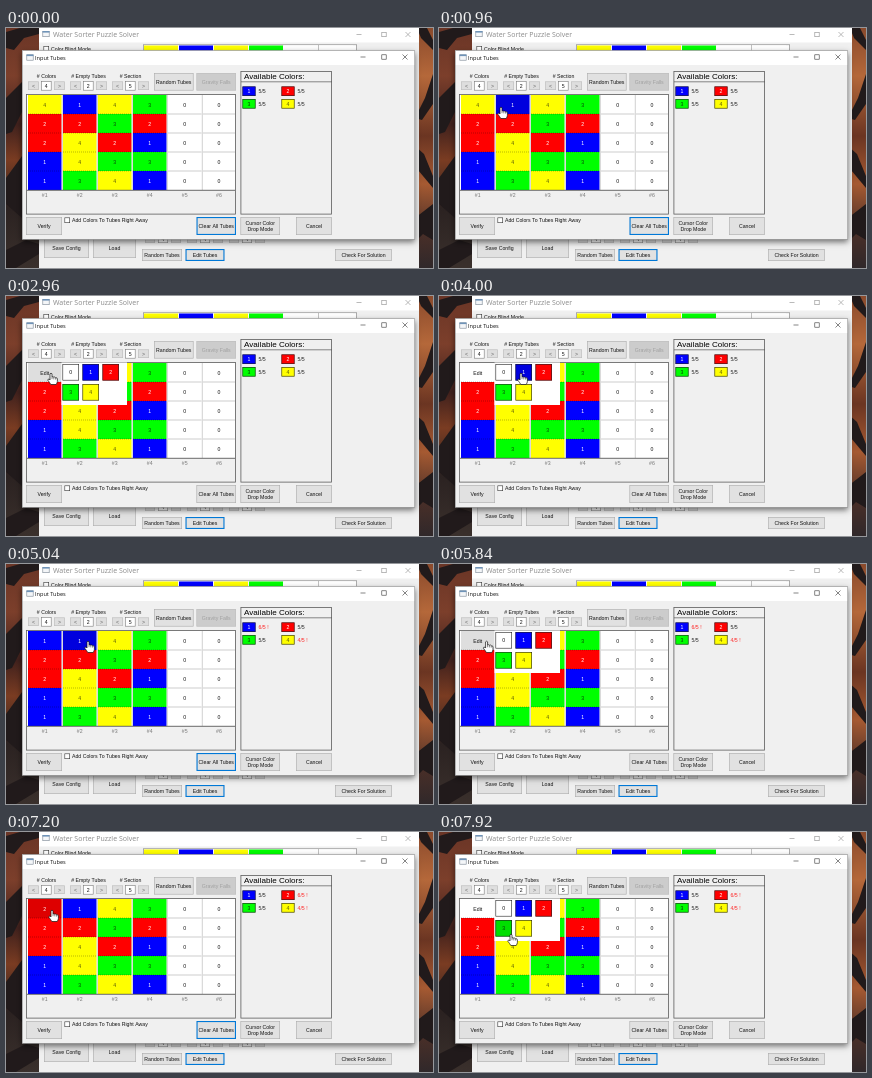
These frames come from a looping animation (427 px wide and 240 px high, 8 s). An HTML page with a canvas:

```html
<!DOCTYPE html>
<html lang="en">
<head>
<meta charset="utf-8">
<title>Input Tubes</title>
<style>
  html, body { margin: 0; width: 100%; height: 100%; overflow: hidden; background: #2a2020; }
  canvas { display: block; width: 427px; height: 240px; }
</style>
</head>
<body>
<canvas id="stage"></canvas>
<script>
const W = 427, H = 240, LOOP = 8000;
const canvas = document.getElementById('stage');
const ratio = window.devicePixelRatio || 1;
canvas.width = W * ratio;
canvas.height = H * ratio;
const ctx = canvas.getContext('2d');
ctx.scale(ratio, ratio);

const SANS = '"Liberation Sans", Arial, sans-serif';
const TITLE = '"Open Sans", sans-serif';
const FACE = '#f0f0f0', BLUE = '#0078d7';
const FILL = ['#ffffff', '#0000ff', '#ff0000', '#00ff00', '#ffff00'];
const INK = ['#111111', '#ffffff', '#ffffff', '#084008', '#55550a'];
const TUBES = [
  [4, 2, 2, 1, 1], [1, 2, 4, 4, 3], [4, 3, 2, 3, 4],
  [3, 2, 1, 3, 1], [0, 0, 0, 0, 0], [0, 0, 0, 0, 0]
];

// Intervals in which the colour popup is open
const POPUPS = [[2720, 4240], [5600, 6720], [7280, LOOP]];

// Cursor hot spot: time, x, y
const PATH = [
  [0, 112, 250], [80, 112, 246], [640, 66, 98], [960, 62, 79], [1360, 118, 86],
  [1760, 168, 114], [1920, 168, 115], [2560, 45, 77], [3040, 45, 77],
  [3900, 82, 77], [5080, 82, 77], [5520, 45, 77], [5760, 45, 77],
  [6400, 104, 78], [6760, 104, 78], [7180, 46, 78], [7360, 46, 78], [7840, 72, 102], [8000, 72, 102]
];

function rect(x, y, w, h, fill, edge, line = 0.6) {
  if (fill) {
    ctx.fillStyle = fill;
    ctx.fillRect(x, y, w, h);
  }
  if (edge) {
    ctx.strokeStyle = edge;
    ctx.lineWidth = line;
    ctx.strokeRect(x + line / 2, y + line / 2, w - line, h - line);
  }
}

function text(s, x, y, { size = 5.2, color = '#111', align = 'left', font = SANS } = {}) {
  ctx.font = `${size}px ${font}`;
  ctx.fillStyle = color;
  ctx.textAlign = align;
  ctx.fillText(s, x, y);
}

function line(points, color, width = 0.6, dash = []) {
  ctx.beginPath();
  points.forEach(([x, y]) => ctx.lineTo(x, y));
  ctx.setLineDash(dash);
  ctx.strokeStyle = color;
  ctx.lineWidth = width;
  ctx.stroke();
  ctx.setLineDash([]);
}

function polygon(points, fill) {
  ctx.beginPath();
  points.forEach(([x, y]) => ctx.lineTo(x, y));
  ctx.closePath();
  ctx.fillStyle = fill;
  ctx.fill();
}

function button(label, x, y, w, h, { focus = false, disabled = false } = {}) {
  rect(x, y, w, h, disabled ? '#cccccc' : '#e1e1e1',
    focus ? BLUE : disabled ? '#bfbfbf' : '#adadad', focus ? 1.1 : 0.6);
  const rows = label.split('\n');
  rows.forEach((row, i) => text(row, x + w / 2, y + h / 2 + 2 + (i - (rows.length - 1) / 2) * 6.2,
    { align: 'center', color: disabled ? '#a0a0a0' : '#111' }));
}

function checkbox(label, x, y) {
  rect(x, y, 5.5, 5.5, '#fff', '#333');
  text(label, x + 7.5, y + 4.6);
}

function windowButtons(xs, y, color) {
  const [min, max, close] = xs;
  line([[min - 2.5, y], [min + 2.5, y]], color);
  rect(max - 2.5, y - 2.5, 5, 5, null, color);
  line([[close - 2.5, y - 2.5], [close + 2.5, y + 2.5]], color);
  line([[close + 2.5, y - 2.5], [close - 2.5, y + 2.5]], color);
}

function icon(x, y) {
  rect(x, y, 7, 6, '#f4f6f8', '#7d8894');
  rect(x, y, 7, 1.6, '#6f93b8');
}

function wallpaper() {
  const left = ctx.createLinearGradient(0, 0, 0, H);
  [[0, '#6a3526'], [0.2, '#7c3f2b'], [0.4, '#40211d'], [0.55, '#7a3c22'], [0.75, '#2b2221'], [1, '#3a302c']]
    .forEach(stop => left.addColorStop(...stop));
  rect(0, 0, 40, H, left);
  const right = ctx.createLinearGradient(0, 0, 0, H);
  [[0, '#8a4a2c'], [0.2, '#b5683a'], [0.45, '#6b3522'], [0.65, '#a65a32'], [0.85, '#4a2f28'], [1, '#30282a']]
    .forEach(stop => right.addColorStop(...stop));
  rect(400, 0, 27, H, right);
  const dark = '#211a1b';
  polygon([[0, 4], [14, 0], [33, 0], [33, 6], [18, 10], [8, 22], [0, 20]], dark);
  polygon([[0, 70], [16, 54], [16, 84], [6, 104], [0, 106]], dark);
  polygon([[0, 150], [16, 128], [16, 190], [0, 176]], dark);
  polygon([[0, 222], [20, 212], [33, 216], [33, 226], [10, 240], [0, 240]], dark);
  polygon([[411, 0], [421, 0], [427, 12], [427, 22], [415, 10]], dark);
  polygon([[427, 46], [427, 76], [416, 92], [409, 90], [419, 70]], dark);
  polygon([[409, 118], [418, 126], [427, 148], [427, 160], [412, 142]], dark);
  polygon([[409, 190], [427, 176], [427, 212], [417, 206], [409, 214]], dark);
}

function mainWindow() {
  rect(33, 0, 380, H, FACE);
  rect(33, 0, 380, 14.5, '#fff');
  icon(36.5, 3);
  text('Water Sorter Puzzle Solver', 47, 9, { size: 7, font: TITLE, color: '#8a8a8a' });
  windowButtons([353, 378, 402], 6.5, '#8c8c8c');
  checkbox('Color Blind Mode', 37.5, 18);
  rect(137, 16.5, 214, 8, '#fff', '#777');
  TUBES.forEach((tube, i) => rect(138 + 35 * i, 17.5, 34, 8, FILL[tube[0]]));
  line([[312.5, 17], [312.5, 23]], '#999');

  button('Save Config', 38, 210, 45, 20);
  button('Load', 87, 210, 43, 20);
  for (const x of [139, 181, 223]) {
    rect(x, 206, 10, 9, '#ddd', '#bbb');
    rect(x + 13, 206, 10, 9, '#fff', '#888');
    rect(x + 26, 206, 10, 9, '#ddd', '#bbb');
    text('4', x + 18, 213, { align: 'center' });
  }
  button('Random Tubes', 136, 221, 40, 12);
  button('Edit Tubes', 179.5, 221, 39, 12, { focus: true });
  button('Check For Solution', 329, 221, 57, 12);
}

function spinner(label, value, x) {
  text(label, x + 18.5, 50, { align: 'center' });
  rect(x, 53.5, 11, 8.5, '#dedede', '#bdbdbd');
  rect(x + 13, 53, 10.5, 9.5, '#fff', '#777');
  rect(x + 26, 53.5, 11, 8.5, '#dedede', '#bdbdbd');
  text('<', x + 5.5, 59.6, { align: 'center', color: '#666' });
  text(value, x + 18.2, 59.8, { align: 'center' });
  text('>', x + 31.5, 59.6, { align: 'center', color: '#666' });
}

function dialog(popupOpen) {
  ctx.save();
  ctx.shadowColor = 'rgba(0,0,0,.55)';
  ctx.shadowBlur = 6 * ratio;
  ctx.shadowOffsetY = 2 * ratio;
  rect(16, 22.5, 393, 189, FACE);
  ctx.restore();
  rect(16, 22.5, 393, 14.5, '#fff');
  rect(16, 22.5, 393, 189, null, '#777', 0.5);
  icon(20.5, 26.5);
  text('Input Tubes', 29, 31.7, { size: 5.6, font: TITLE });
  windowButtons([357, 378, 399], 29, '#333');

  spinner('# Colors', '4', 22);
  spinner('# Empty Tubes', '2', 64);
  spinner('# Section', '5', 106);
  button('Random Tubes', 148, 45, 39.5, 17.5);
  button('Gravity Falls', 190.5, 45, 39.5, 17.5, { disabled: true });

  button('Verify', 20, 189, 36, 18);
  checkbox('Add Colors To Tubes Right Away', 58.5, 189.5);
  button('Clear All Tubes', 190.5, 189, 39.5, 18, { focus: !popupOpen });
  button('Cursor Color\nDrop Mode', 234.5, 189, 39.5, 18);
  button('Cancel', 290, 189, 36, 18);
}

function swatch(value, x, y, w, h, cursor, edge, label = value) {
  rect(x, y, w, h, FILL[value], edge);
  const [cx, cy] = cursor;
  if (cx >= x && cx <= x + w && cy >= y && cy <= y + h) rect(x, y, w, h, 'rgba(0,0,0,.13)');
  text(label, x + w / 2, y + h / 2 + 2, { align: 'center', color: INK[value] });
}

function table(tubes, cursor, popupOpen) {
  rect(20, 66, 210, 120.5, FACE, '#5c5c5c', 0.8);
  rect(21, 67, 208, 95.5, '#fff');
  tubes.forEach((tube, col) => {
    const x = 22 + 35 * col, w = col === 5 ? 32 : 33.5;
    tube.forEach((value, row) => {
      const y = 67 + 19 * row;
      const editing = popupOpen && col === 0 && row === 0;
      swatch(editing ? 0 : value, x, y, w, 19, cursor, null, editing ? 'Edit' : value);
      if (row) line([[x, y], [x + w, y]], value ? 'rgba(0,0,0,.55)' : '#999', 0.5, value ? [1, 1] : []);
    });
    if (col) line([[x - 0.7, 67], [x - 0.7, 162]], '#888', 0.4);
    text('#' + (col + 1), x + w / 2, 168.7, { align: 'center', color: '#777' });
  });
  line([[21, 162.3], [229, 162.3]], '#444', 0.8);
}

function availableColors(tubes) {
  rect(234.5, 43, 91.5, 143.5, FACE, '#5c5c5c', 0.8);
  text('Available Colors:', 238, 51, { size: 8.1, color: '#000' });
  line([[235, 53.8], [326, 53.8]], '#555', 0.7);
  const cells = tubes.flat();
  for (let value = 1; value <= 4; value++) {
    const x = value % 2 ? 236.5 : 275.5, y = value < 3 ? 58.5 : 71;
    const count = cells.filter(v => v === value).length;
    swatch(value, x, y, 13, 9.5, [-1, -1], '#222');
    text(count === 5 ? '5/5' : count + '/5 !', x + 16, y + 6.8, { color: count === 5 ? '#222' : '#f22' });
  }
}

function popup(cursor) {
  rect(55.5, 66.5, 65.5, 42.5, '#fff');
  for (let value = 0; value <= 4; value++) {
    swatch(value, 56.5 + 20 * (value % 3), 68 + 20 * Math.floor(value / 3), 16.5, 16.5, cursor, '#222');
  }
}

function drawCursor([x, y]) {
  const overCells = x > 21 && x < 229 && y > 67 && y < 162;
  ctx.save();
  ctx.translate(x, y);
  const shape = new Path2D(overCells
    ? 'M-1 0.8Q0-.5 1 .8V4Q2 3.2 2.8 4.2Q4 3.5 4.6 4.7Q6.2 4.3 6.4 6V8.4Q6.2 10 5.2 11.5H-.2Q-1.3 9.5-3.2 7.2Q-3.2 5.7-1.7 6.2L-1 7Z'
    : 'M0 0V9L2 7.2L3.4 10.3L4.8 9.7L3.5 6.6H6.2Z');
  ctx.fillStyle = '#fff';
  ctx.fill(shape);
  ctx.strokeStyle = '#111';
  ctx.lineWidth = 0.7;
  ctx.stroke(shape);
  if (overCells) {
    line([[1, 4], [1, 6.2]], '#111', 0.5);
    line([[2.8, 4.4], [2.8, 6.4]], '#111', 0.5);
    line([[4.6, 4.9], [4.6, 6.6]], '#111', 0.5);
  }
  ctx.restore();
}

function cursorAt(t) {
  const i = Math.max(1, PATH.findIndex(key => key[0] > t));
  const [t0, x0, y0] = PATH[i - 1], [t1, x1, y1] = PATH[i];
  const p = (t - t0) / (t1 - t0), ease = p * p * (3 - 2 * p);
  return [x0 + (x1 - x0) * ease, y0 + (y1 - y0) * ease];
}

function draw(t) {
  const cursor = cursorAt(t);
  const popupOpen = POPUPS.some(([from, to]) => t >= from && t < to);
  const tubes = TUBES.map(tube => [...tube]);
  tubes[0][0] = t < POPUPS[0][1] ? 4 : t < POPUPS[1][1] ? 1 : 2;
  wallpaper();
  mainWindow();
  dialog(popupOpen);
  table(tubes, cursor, popupOpen);
  availableColors(tubes);
  if (popupOpen) popup(cursor);
  drawCursor(cursor);
}

function frame() {
  draw(performance.now() % LOOP);
  requestAnimationFrame(frame);
}
frame();
</script>
</body>
</html>
```
